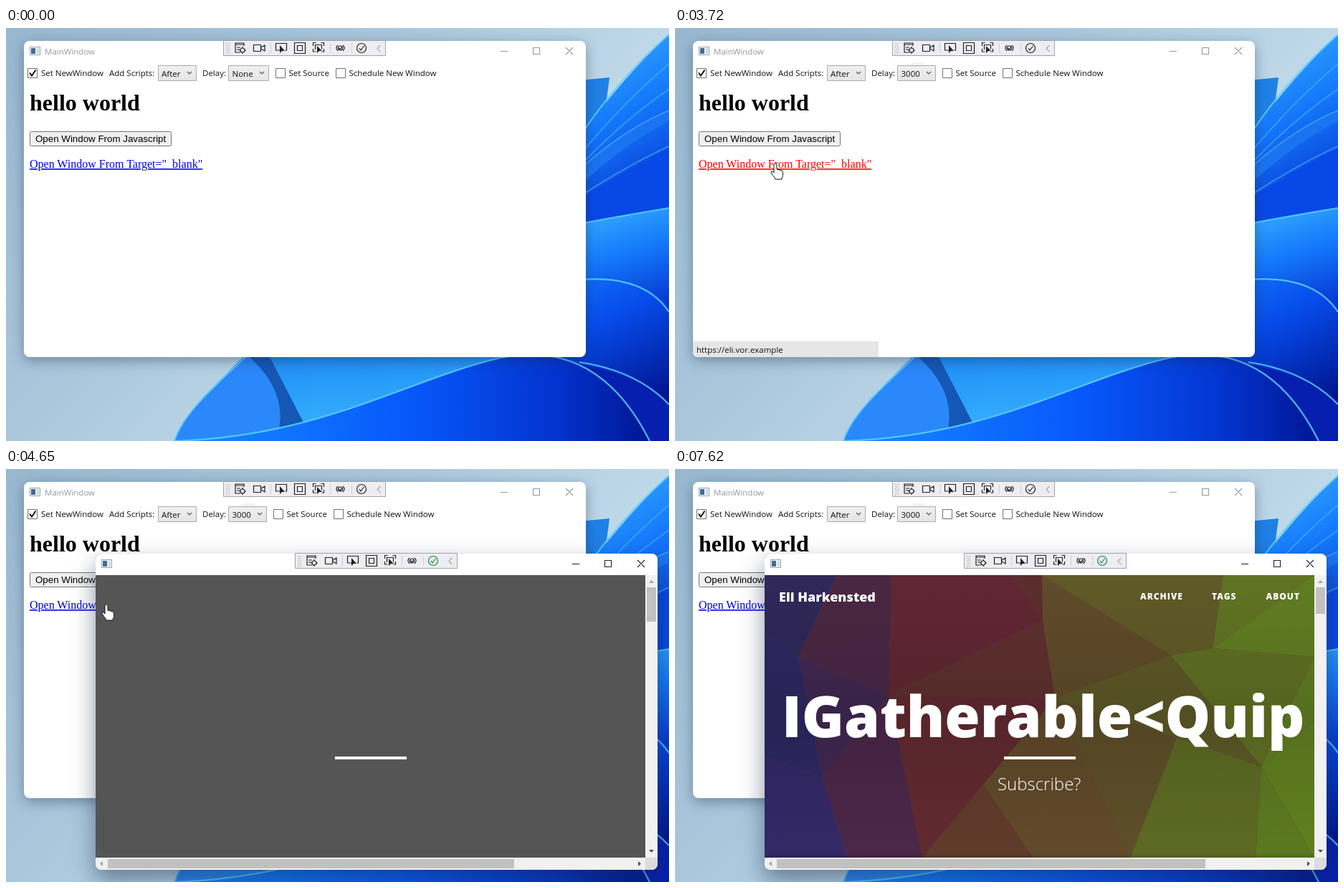
Write an HTML page that moves like this. It is 925 by 576 pixels and loops after 8.68 s.

```html
<!DOCTYPE html>
<html lang="en">
<head>
<meta charset="utf-8">
<title>Window demo</title>
<style>
html, body { margin: 0; width: 100%; height: 100%; overflow: hidden; }
svg { display: block; width: 100vw; height: 100vh; }
.ui { font: 11.5px "Open Sans", "Noto Sans", sans-serif; fill: #111; }
.serif { font-family: "Liberation Serif", serif; }
.site { font-family: "Open Sans", sans-serif; fill: #fff; font-weight: 800; }
.line { fill: none; stroke: #222; stroke-width: 1.2; }
.edge { fill: none; stroke: #5fd0ff; stroke-width: 2.2; stroke-opacity: .85; }
.fold { fill: none; stroke: #5fc4ff; stroke-width: 1.5; stroke-opacity: .6; }
.box { fill: #fff; stroke: #707070; }
.combo { fill: url(#comboFill); stroke: #acacac; }
.chevron { fill: none; stroke: #555; stroke-width: 1.2; }
.shadow { fill: #555; filter: drop-shadow(0 14px 16px rgba(20, 40, 70, .5)); }
.soft { filter: drop-shadow(0 5px 9px rgba(20, 40, 70, .4)); }

/* Hard changes */
.cut { animation: 8.68s step-end infinite; }
#main { animation-name: activeColor; }
#mainShadow { animation-name: activeShadow; }
#hover { animation-name: hover; }
#menu { animation-name: menu; }
#pick { animation-name: pick; }
#none { animation-name: before; }
#chosen { animation-name: after; }
#options { animation-name: shift; }
#trace { animation-name: trace; }
#link { animation-name: link; }
#status { animation-name: status; }
#tools { animation-name: tools; }
#page { animation-name: page; }
#art { animation-name: art; }
#copy { animation-name: copy; }
#thumbA { animation-name: thumbBefore; }
#thumbB { animation-name: thumbAfter; }
#arrow { animation-name: arrow; }
#hand { animation-name: hand; }
@keyframes activeColor { 0%, 41.475% { color: #8f9a9e } 14.747% { color: #16213f } }
@keyframes activeShadow { 0%, 41.475% { opacity: 0 } 14.747% { opacity: 1 } }
@keyframes hover { 0%, 27.19% { opacity: 0 } 7% { opacity: 1 } }
@keyframes menu { 0%, 27.88% { opacity: 0 } 15.553% { opacity: 1 } }
@keyframes pick {
  0% { transform: none } 20.53% { transform: translateY(20px) }
  21.61% { transform: translateY(40px) } 22.7% { transform: translateY(60px) }
}
@keyframes before { 0% { opacity: 1 } 27.88% { opacity: 0 } }
@keyframes after { 0% { opacity: 0 } 27.88% { opacity: 1 } }
@keyframes shift { 0% { transform: none } 27.88% { transform: translateX(-3px) } }
@keyframes trace { 0% { opacity: 0 } 14.747% { opacity: 1 } }
@keyframes link { 0%, 50.69% { fill: #00e } 40.553% { fill: #f00 } }
@keyframes status { 0%, 50.69% { opacity: 0 } 40.553% { opacity: 1 } }
@keyframes tools { 0% { opacity: 0 } 50.69% { opacity: 1 } }
@keyframes page { 0% { opacity: 0 } 51.49% { opacity: 1 } }
@keyframes art { 0% { opacity: 0 } 55.3% { opacity: 1 } }
@keyframes copy { 0% { opacity: 0 } 57.604% { opacity: 1 } }
@keyframes thumbBefore { 0% { opacity: 1 } 59.1% { opacity: 0 } }
@keyframes thumbAfter { 0% { opacity: 0 } 59.1% { opacity: 1 } }
@keyframes arrow { 0%, 36.9%, 87.788% { opacity: 0 } 1.498%, 67.6% { opacity: 1 } }
@keyframes hand { 0%, 67.6% { opacity: 0 } 36.9% { opacity: 1 } }

/* Motion */
#popup { transform-origin: 517px 338.5px; animation: open 8.68s linear infinite; }
@keyframes open {
  0%, 43.7% { opacity: 0; transform: translate(-5px, -1px) scale(.91) }
  45.392% { opacity: .88; transform: translate(-3.5px, -1px) scale(.948) }
  47.581%, 100% { opacity: 1; transform: none }
}
#pointer { animation: roam 8.68s linear infinite; }
@keyframes roam {
  0%, 1.498% { transform: translate(772px, 535px) }
  3.11% { transform: translate(640px, 380px) }
  5.18% { transform: translate(450px, 180px) }
  7.03% { transform: translate(330px, 75px) }
  7.83% { transform: translate(299px, 58px) }
  9.332%, 12.32% { transform: translate(338px, 55px) }
  13.134%, 18.55% { transform: translate(338px, 60px) }
  19.355% { transform: translate(338px, 73px) }
  23.272%, 30.88% { transform: translate(329px, 146px) }
  31.682% { transform: translate(316px, 145px); animation-timing-function: ease-out }
  38.94%, 66.71% { transform: translate(140px, 189px) }
  68.32% { transform: translate(210px, 166px) }
  71.429% { transform: translate(416px, 208px); animation-timing-function: ease-out }
  74.65% { transform: translate(721px, 204px) }
  76.959%, 77% { transform: translate(590px, 208px) }
  78.57% { transform: translate(531px, 200px); animation-timing-function: ease-in-out }
  86.982%, 100% { transform: translate(888px, 575px) }
}
</style>
</head>
<body>
<svg viewBox="0 0 925 576">
<defs>
  <linearGradient id="sky" y2=".6"><stop stop-color="#98b8d0"/><stop offset=".45" stop-color="#aac7dc"/><stop offset=".75" stop-color="#c0d9e9"/></linearGradient>
  <linearGradient id="petal" x2=".25" y2="1"><stop stop-color="#39b2ff"/><stop offset=".5" stop-color="#1478fb"/><stop offset="1" stop-color="#0639d2"/></linearGradient>
  <linearGradient id="deep" x2=".5" y2="1"><stop stop-color="#1680ff"/><stop offset=".45" stop-color="#064bea"/><stop offset="1" stop-color="#00128a"/></linearGradient>
  <linearGradient id="glow" y2="1" x2=".3"><stop stop-color="#1c88f4"/><stop offset="1" stop-color="#38b4ff"/></linearGradient>
  <linearGradient id="ribbon"><stop stop-color="#168cff"/><stop offset=".5" stop-color="#0758fb"/><stop offset=".8" stop-color="#0434cf"/><stop offset="1" stop-color="#001694"/></linearGradient>
  <linearGradient id="comboFill" x2="0" y2="1"><stop stop-color="#f0f0f0"/><stop offset="1" stop-color="#e5e5e5"/></linearGradient>
  <linearGradient id="shade" x2="0" y2="1"><stop stop-opacity="0"/><stop offset=".5" stop-opacity=".12"/><stop offset=".98" stop-opacity="0"/><stop offset="1" stop-opacity=".12"/></linearGradient>
  <clipPath id="frame"><rect x="125" y="118" width="784" height="441" rx="8"/></clipPath>

  <g id="chrome">
    <rect x="25" y="18" width="784" height="441" rx="8" fill="#fff"/>
    <rect x="33.5" y="26.5" width="14" height="11" fill="#f3f6f8" stroke="#9aa5ad"/>
    <path d="M35 28h6v8h-6z" fill="#3f6f96"/>
    <path d="M43 28h3v8h-3z" fill="#cfd8de"/>
    <path d="M690 32.5h10M735.5 27.5h9v9h-9zM781 27l10 10m0-10l-10 10" fill="none" stroke="currentColor" stroke-width="1.1"/>
  </g>

  <g id="toolbar">
    <path d="M303.5 17.5h226v21h-226z" fill="#eeeef2" stroke="#a0a3ab"/>
    <path d="M307.5 21v16M311.5 21v16M309.5 22v15" stroke="#999" stroke-dasharray="1 2"/>
    <g class="line">
      <path d="M327 34h-7V21h12v4M320 23h12M322 27h5M322 30h4"/>
      <circle cx="330" cy="31" r="3"/>
      <path d="M330 26v2m0 6v2m-5-5h2m6 0h2"/>
      <path d="M345.5 23.5h10v9h-10zM356 27l5-3v8l-5-3"/>
      <path d="M382 31h-5.500v-9.500h15v9.500h-2"/>
      <path d="M402.5 20.500h15v15h-15zM406.500 24.500h7v7h-7z"/>
      <path d="M428.500 25v-4.500h4m7 0h4v4.500m0 4v4h-3m-8 0h-4v-4M431.500 30v-6.500h9v6"/>
      <path d="M463 24q-4 4 0 8m7-8q4 4 0 8M464 28l2 2 3-4"/>
      <circle cx="466.500" cy="28" r="3"/>
      <circle cx="496" cy="28" r="6.500" style="stroke:var(--ok,#222);fill:var(--okFill,#eeeef2)"/>
      <path d="M493 28l2 3 4.500-6" style="stroke:var(--ok,#222)"/>
      <path d="M522.500 24l-4.500 4.500 4.500 4.500" style="stroke:#aaa"/>
    </g>
    <path d="M382 24v11l3-3h4zM434 25v10l3-3h4z" fill="#222"/>
    <path d="M369.500 21v14M452.500 21v14M482.500 21v14" stroke="#ccced8"/>
  </g>
</defs>

<!-- Desktop -->
<rect width="925" height="576" fill="url(#sky)"/>
<path d="M800 73L842 69 830 160H800z" fill="#1f80e6"/>
<path d="M800 150C835 105 880 50 925 9V280H800z" fill="url(#petal)"/>
<path d="M800 197Q865 140 925 115V130Q865 160 800 220z" fill="#1a74f2"/>
<path d="M800 240Q870 195 925 168V260L800 275z" fill="#0848e6"/>
<path class="edge" d="M805 145Q855 70 925 9"/>
<path class="fold" d="M805 172Q860 105 925 50M805 188Q860 130 925 85M805 193Q865 140 925 115M805 232Q870 190 925 165"/>
<path d="M800 273Q865 261 925 251V410H800z" fill="url(#petal)"/>
<path class="edge" d="M800 273Q865 261 925 251"/>
<path d="M800 352C850 346 898 355 925 398V576H700V455H800z" fill="url(#deep)"/>
<path class="edge" d="M800 351C850 347 898 355 925 396"/>
<path d="M235 576C245 540 290 500 335 455H730V576z" fill="url(#glow)"/>
<path d="M235 576C245 540 290 500 335 455H366L418 556Q340 574 300 576z" fill="#2b88fa"/>
<path d="M335 455H366L418 556Q395 562 380 564C390 520 370 485 335 455z" fill="#1557b4"/>
<path d="M760 462Q880 478 925 525V576H760z" fill="#061fae"/>
<path class="edge" d="M800 466Q880 478 925 525"/>
<path d="M235 576C440 570 560 490 690 460C790 440 855 490 898 576z" fill="url(#ribbon)"/>
<path class="edge" d="M235 576C440 570 560 490 690 460C790 440 855 490 898 576M235 576C245 540 290 500 335 458"/>

<!-- Main window -->
<g id="main" class="cut ui">
  <g id="mainShadow" class="cut"><rect class="shadow" x="25" y="18" width="784" height="441" rx="8"/></g>
  <use href="#chrome" class="soft"/>
  <text x="54" y="37" fill="currentColor">MainWindow</text>
  <use href="#toolbar"/>
  <ellipse id="trace" class="cut" cx="339" cy="50" rx="10" ry="2.5" fill="#f0f6ee"/>
  <path class="box" d="M30.5 56.5h13v13h-13z"/>
  <path d="M33 62.5l3 4 5.500-8" fill="none" stroke="#111" stroke-width="2"/>
  <text x="49" y="67">Set NewWindow</text>
  <text x="144" y="67">Add Scripts:</text>
  <path class="combo" d="M212.5 52.5h53v21h-53z"/>
  <text x="217" y="68">After</text>
  <path class="chevron" d="M253 61l3 3 3-3"/>
  <text x="274" y="67">Delay:</text>
  <g id="none" class="cut">
    <path class="combo" d="M310.5 52.5h56v21h-56z"/>
    <path id="hover" class="cut" d="M310.5 52.5h56v21h-56z" fill="#e3f1fb" stroke="#7eb4ea"/>
    <text x="315.5" y="68">None</text>
    <path class="chevron" d="M354 61l3 3 3-3"/>
  </g>
  <g id="chosen" class="cut">
    <path class="combo" d="M310.5 52.5h53v21h-53z"/>
    <text x="315.5" y="68">3000</text>
    <path class="chevron" d="M351 61l3 3 3-3"/>
  </g>
  <g id="options" class="cut">
    <path class="box" d="M376.5 56.5h13v13h-13zM460.5 56.5h13v13h-13z"/>
    <text x="394.5" y="67">Set Source</text>
    <text x="478.5" y="67">Schedule New Window</text>
  </g>

  <text class="serif" x="33" y="115" font-size="32" font-weight="700" fill="#000">hello world</text>
  <rect x="33.5" y="144.5" width="197" height="20" rx="2" fill="#efefef" stroke="#767676"/>
  <text x="41" y="159" style="font:13.333px 'Liberation Sans',sans-serif" fill="#000">Open Window From Javascript</text>
  <text id="link" class="cut serif" x="33" y="195" font-size="16" text-decoration="underline">Open Window From Target="_blank"</text>
  <g id="status" class="cut">
    <path d="M25 437h259v22H32q-7 0-7-7z" fill="#e6e6e6"/>
    <text x="30" y="453">https://eli.vor.example</text>
  </g>

  <g id="menu" class="cut">
    <path d="M314 79h56v80h-56z" fill="#000" opacity=".45" style="filter:blur(1.5px)"/>
    <path d="M310.5 74.5h56v81h-56z" fill="#fff" stroke="#666"/>
    <path id="pick" class="cut" d="M311.5 75.5h54v19h-54z" fill="#cbe8f6" stroke="#26a0da"/>
    <text x="316" y="90">None</text>
    <text x="316" y="110">1000</text>
    <text x="316" y="130">2000</text>
    <text x="316" y="150">3000</text>
  </g>
</g>

<!-- Second window -->
<g id="popup" color="#16213f">
  <rect class="shadow" x="125" y="118" width="784" height="441" rx="8"/>
  <use href="#chrome" x="100" y="100"/>
  <use id="tools" class="cut" href="#toolbar" x="100" y="100" style="--ok:#2f7d4a;--okFill:#dff2e4"/>
  <g id="page" class="cut" clip-path="url(#frame)">
    <path d="M125 148h767v394H125z" fill="#555"/>
    <g id="art" class="cut">
      <path d="M125 148h767v394H125z" fill="#55452e"/>
      <path d="M125 148H225L172 262 125 230z" fill="#2f2859"/>
      <path d="M225 148h77l-2 77-128 37z" fill="#4a2742"/>
      <path d="M302 148H470l43 63-215 104z" fill="#612732"/>
      <path d="M470 148h42l1 63z" fill="#5b2e2e"/>
      <path d="M512 148L692 260 530 320 513 211z" fill="#604b2a"/>
      <path d="M512 148H765L750 250 692 260z" fill="#605a28"/>
      <path d="M765 148H892L750 250z" fill="#607323"/>
      <path d="M892 148V262L750 250z" fill="#617d22"/>
      <path d="M750 250l142 12-74 153L692 260z" fill="#607023"/>
      <path d="M892 262v88l-74 65z" fill="#617d23"/>
      <path d="M892 350V542L818 415z" fill="#607f21"/>
      <path d="M818 415l74 127h-82z" fill="#5b7920"/>
      <path d="M692 260L818 415 700 375 530 320z" fill="#5d5927"/>
      <path d="M700 375l118 40-8 127H635z" fill="#5d6a23"/>
      <path d="M530 320l170 55-65 167z" fill="#5e4f29"/>
      <path d="M530 320L635 542H345z" fill="#614a2a"/>
      <path d="M430 440l70 102H345z" fill="#603b2c"/>
      <path d="M298 315l215-104 17 109z" fill="#5f302f"/>
      <path d="M298 315l232 5-185 222z" fill="#612a30"/>
      <path d="M172 262l128-37-2 90z" fill="#4a2747"/>
      <path d="M172 262l126 53-93 115z" fill="#402852"/>
      <path d="M125 230l47 32 33 168-80-30z" fill="#2d2862"/>
      <path d="M205 430l93-115 47 227H240z" fill="#4b2749"/>
      <path d="M125 400l80 30 35 112H125z" fill="#332966"/>
      <path d="M125 148h767v394H125z" fill="url(#shade)"/>
    </g>
    <path d="M459 401h100v4H459z" fill="#fff"/>
    <g id="copy" class="cut site">
      <text x="145" y="185" font-size="18">Eli Harkensted</text>
      <g font-size="12" letter-spacing="1">
        <text x="649" y="182">ARCHIVE</text>
        <text x="749" y="182">TAGS</text>
        <text x="824.5" y="182">ABOUT</text>
      </g>
      <text x="149" y="374" font-size="80">IGatherable&lt;Quip</text>
      <text x="450" y="448" font-size="24" font-weight="300">Subscribe?</text>
    </g>
    <path d="M892 148h17v411H125v-17h767z" fill="#f1f1f1"/>
    <path d="M892 542h17v17h-17z" fill="#dcdcdc"/>
    <path id="thumbA" class="cut" d="M894 165h13v48h-13zM142 544h567v13H142z" fill="#c1c1c1"/>
    <path id="thumbB" class="cut" d="M894 165h13v37h-13zM142 544h598v13H142z" fill="#c1c1c1"/>
    <path d="M897 159h7l-3.500-4zM135 547v7l-4-3.500z" fill="#a3a3a3"/>
    <path d="M897 531h7l-3.500 4zM882 547v7l4-3.500z" fill="#505050"/>
  </g>
</g>

<g id="pointer" fill="#fff" stroke="#111" stroke-linejoin="round">
  <path id="arrow" class="cut" d="M.5.5V16.5l3.700-3.500 2.600 6 2.700-1.200-2.600-5.800H12z"/>
  <path id="hand" class="cut" d="M-2 1q2-2.500 4 0v7l6 1.500q2.500.600 2.500 3v4q0 2-1.500 3.500v2H0q-1-3-3.500-5.500l-2.500-4q0-2.500 2.300-1.500l1.700 2z"/>
</g>
</svg>
</body>
</html>
```
